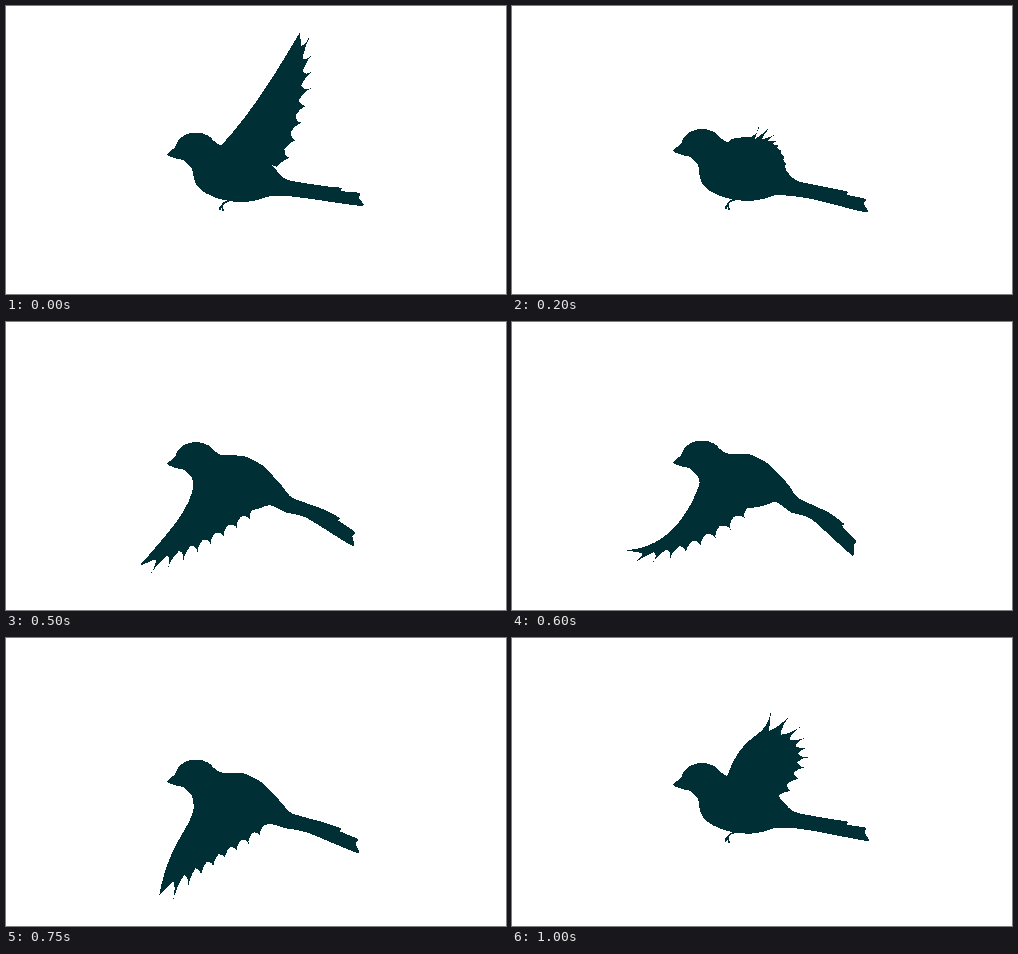
Write an HTML page that moves like this. It is 500 px wide and 288 px high and loops after 1.05 s.

```html
<!DOCTYPE html>
<html lang="en">
<head>
<meta charset="utf-8">
<title>Flying bird</title>
<style>
  html, body { margin: 0; width: 100%; height: 100%; overflow: hidden; background: #fff; }
  svg { display: block; width: 500px; height: 288px; fill: #012f36; shape-rendering: crispEdges; }
  #foot { fill: none; stroke: #012f36; stroke-width: 1.8; }
</style>
</head>
<body>
<svg viewBox="0 0 500 288">
  <path id="foot"/>
  <path id="body"/>
  <path id="up"/>
  <path id="down"/>
</svg>
<script>
const STEP = 50, STEPS = 21, FEATHERS = 8;

const mix = (a, b, k) => a + (b - a) * k;
const blend = (a, b, k) => a.map((v, i) => mix(v, b[i], k));
const polar = ([x, y], deg, r) => {
  const a = deg * Math.PI / 180;
  return [x + r * Math.cos(a), y + r * Math.sin(a)];
};

// A wing is a curved leading edge (c1, c2, tip), a trailing curve (start, ctrl, heel)
// and a fan of feathers whose angle and length run from the tip to the heel.
const wing = (edge, trail, angle, length) => ({ edge, trail, angle, length });
const mixWing = (a, b, k) => {
  const out = {};
  for (const key in a) out[key] = blend(a[key], b[key], k);
  return out;
};
const tuck = (w, x, y) => {
  const pull = pts => pts.map((v, i) => mix(i % 2 ? y : x, v, 0.3));
  return wing(pull(w.edge), pull(w.trail), w.angle, [0, 0]);
};

const hump = wing([224,130, 240,131, 252,137], [250,139, 264,149, 274,166], [0, 10], [3, 2]);
const stub = wing([202,182, 194,186, 171,208], [183,206, 258,219, 264,187], [150, 80], [9, 2]);
const upHidden = tuck(hump, 235, 165), downHidden = tuck(stub, 222, 168);

// lift moves the head, bend turns the tail.
const poses = [
  { lift: 3.5, bend: 0, down: downHidden,
    up: wing([248,104, 274,60, 294,26], [295,40, 303,88, 271,161], [-72, 0], [22, 10]) },
  { lift: 2, bend: 2, down: downHidden,
    up: wing([232,90, 254,104, 259,73], [257,93, 310,106, 266,158], [-58, 10], [30, 10]) },
  { lift: 0, bend: 4.4, down: downHidden,
    up: wing([225,124, 246,142, 248,116], [243,133, 272,133, 274,170], [-55, 20], [27, 3]) },
  { lift: -0.5, bend: 7, up: hump, down: stub },
  { lift: -1.5, bend: 10.3, up: upHidden,
    down: wing([190,190, 165,195, 153,258], [167,243, 212,218, 258,187], [108, 75], [30, 8]) },
  { lift: -4.5, bend: 24.6, up: upHidden,
    down: wing([182,180, 160,228, 112,228], [130,231, 178,230, 236,184], [155, 60], [20, 9]) }
];

// The beat: [step, pose], straight between.
const beat = [[0, 0], [4, 2], [7, 3], [9, 4], [11, 4.95], [12, 5], [15, 4], [16, 3], [20, 1]];

function poseAt(step) {
  const n = Math.max(1, beat.findIndex(([s]) => s >= step));
  const [s0, p0] = beat[n - 1], [s1, p1] = beat[n];
  return mix(p0, p1, (step - s0) / (s1 - s0));
}

function wingPath(root, { edge, trail, angle, length }) {
  const [x0, y0, x1, y1, x2, y2] = trail;
  const quad = (a, b, c, t) => mix(mix(a, b, t), mix(b, c, t), t);
  const along = t => [quad(x0, x1, x2, t), quad(y0, y1, y2, t)];
  let d = `M${root}C${edge}L${along(0)}`;
  for (let i = 0; i < FEATHERS; i++) {
    const t = (i + 0.5) / FEATHERS, fade = (1 - t) ** 2;
    const base = along(t), next = along((i + 1) / FEATHERS);
    const deg = mix(angle[1], angle[0], fade);
    const len = mix(length[1], length[0], fade * fade);
    const waist = polar(base, deg, len * 0.35);
    d += `Q${waist} ${polar(base, deg, len)}Q${waist} ${next}`;
  }
  return d + "Z";
}

// Closed curve through the points.
function outline(pts) {
  const n = pts.length, at = i => pts[(i + n) % n];
  const handle = (p, a, b, s) => p.map((v, i) => v + s * (b[i] - a[i]));
  let d = "M" + pts[0];
  for (let i = 0; i < n; i++) {
    const [a, b, c, e] = [at(i - 1), at(i), at(i + 1), at(i + 2)];
    d += `C${handle(b, a, c, 0.1)} ${handle(c, b, e, -0.1)} ${c}`;
  }
  return d + "Z";
}

const face = [[161, 145], [170, 149], [178, 151], [186, 159]];
const belly = [[187, 167], [190, 177], [198, 185], [211, 191], [224, 194], [238, 195], [251, 193], [264, 189]];
const tail = [[280, 190], [302, 192.5], [356, 200], [353, 192], [354, 187],
  [335, 185], [336, 182], [318, 180], [286, 175]];
const back = [[277, 168], [268, 158], [256, 146], [238, 137], [216, 136]];

function bodyPath(lift, bend) {
  const shift = (pts, dy) => pts.map(([x, y]) => [x, y + dy]);
  const crown = Array.from({ length: 7 }, (_, i) => {
    const a = mix(-30, -170, i / 6) * Math.PI / 180;
    return [190 + 21.5 * Math.cos(a), 141 + 18 * Math.sin(a)];
  });
  // The tail turns more the farther it is from the rump.
  const bent = tail.map(([x, y]) => {
    const dx = x - 272, dy = y - 180, r = Math.hypot(dx, dy);
    return polar([272, 180], Math.atan2(dy, dx) * 180 / Math.PI + bend * r / 86, r);
  });
  return outline([
    ...shift([...crown, ...face], lift),
    ...shift(belly, lift < 0 ? lift * 2 : lift / 3),
    ...bent,
    ...shift(back, lift)
  ]);
}

const set = (id, d) => document.getElementById(id).setAttribute("d", d);

function draw(step) {
  const p = poseAt(step);
  const i = Math.min(Math.floor(p), poses.length - 2);
  const a = poses[i], b = poses[i + 1], k = p - i;
  const lift = mix(a.lift, b.lift, k);
  set("body", bodyPath(lift, mix(a.bend, b.bend, k)));
  set("up", wingPath([215, 137 + lift * 0.8], mixWing(a.up, b.up, k)));
  set("down", wingPath([188, 160], mixWing(a.down, b.down, k)));
  set("foot", p < 2.6 ? `M225 ${193 + lift / 3}q-9 2 -9 6q-3 1 -2 4M216 ${199 + lift / 3}l1 5` : "");
}

const start = performance.now();
function tick() {
  draw(Math.floor((performance.now() - start) / STEP) % STEPS);
  requestAnimationFrame(tick);
}
tick();
</script>
</body>
</html>
```
